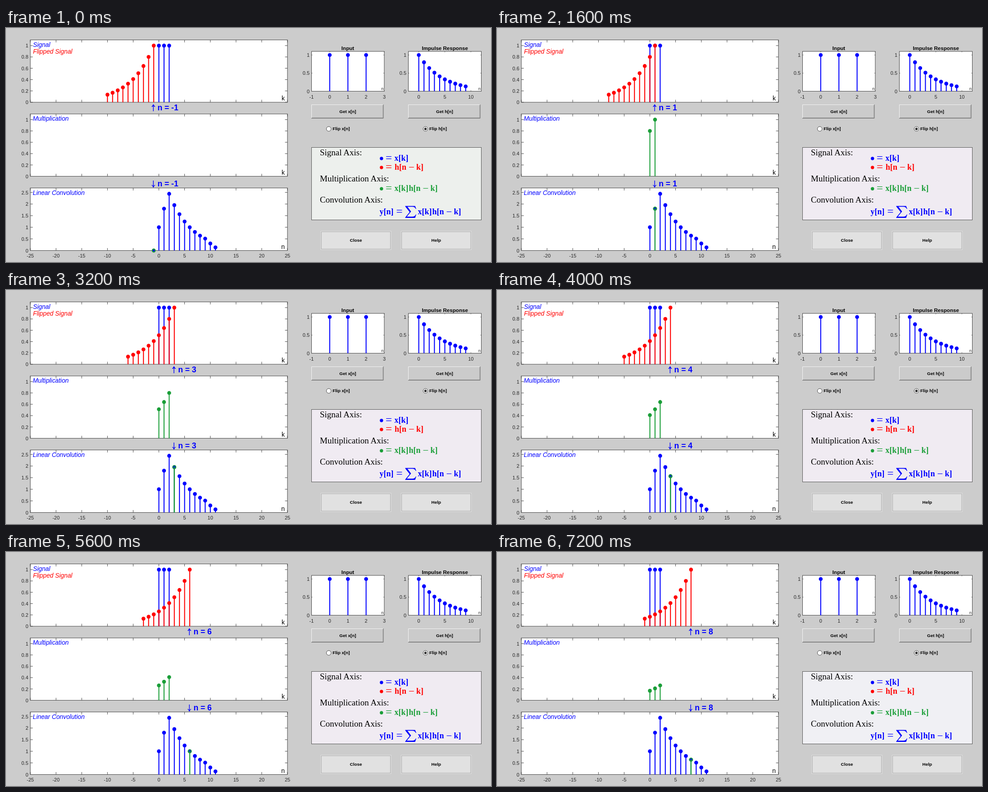
An HTML page that plays this animation: 1077 px wide and 520 px high, repeating every 8 s.

```html
<!DOCTYPE html>
<html lang="en">
<head>
<meta charset="utf-8">
<title>Discrete convolution</title>
<style>
  html, body { margin: 0; width: 100%; height: 100%; overflow: hidden; background: #ccc; }
  svg { display: block; width: 1077px; height: 520px; }
  text { font-family: "Liberation Sans", Arial, sans-serif; white-space: pre; }
  .tick { font-size: 11px; fill: #262626; }
  .title { font-size: 13.8px; font-style: italic; }
  .head { font-size: 11.6px; font-weight: bold; }
  .ui { font-size: 9.9px; font-weight: bold; }
  .mark { font-size: 17.5px; font-weight: bold; }
  .tex, .math { font-family: "Liberation Serif", "Times New Roman", serif; }
  .tex { font-size: 19px; }
  .math { font-size: 18px; font-weight: bold; }
</style>
</head>
<body>
<svg id="stage" viewBox="0 0 1077 520"></svg>
<script>
const NS = "http://www.w3.org/2000/svg";
const BLUE = "#00f", RED = "#f00", GREEN = "#1a9e38", INK = "#262626";
const STEP = 800, FIRST = -1, COUNT = 10;
const stage = document.getElementById("stage");

function add(parent, tag, attrs, content) {
  const el = document.createElementNS(NS, tag);
  for (const key in attrs) el.setAttribute(key, attrs[key]);
  if (content !== undefined) el.textContent = content;
  parent.appendChild(el);
  return el;
}
const group = () => add(stage, "g", {});
const rect = (x, y, width, height, fill, stroke = "none") =>
  add(stage, "rect", { x, y, width, height, fill, stroke });
const path = (parent, d, stroke, width) =>
  add(parent, "path", { d, stroke, "stroke-width": width, fill: "none" });
const dot = (parent, cx, cy, r, fill) => add(parent, "circle", { cx, cy, r, fill });
const text = (x, y, str, cls, fill = "#000", anchor = "start", parent = stage) =>
  add(parent, "text", { x, y, class: cls, fill, "text-anchor": anchor }, str);

// Signals
const input = k => (k >= 0 && k <= 2 ? 1 : 0);
const response = k => (k >= 0 && k <= 9 ? 0.8 ** k : 0);
const range = (from, to) => Array.from({ length: to - from + 1 }, (_, i) => from + i);
const product = (k, n) => input(k) * response(n - k);
const output = n => range(0, 2).reduce((sum, k) => sum + product(k, n), 0);

// Axes: box edges, x limits, y maximum and tick values
function makeAxes({ box: [l, t, r, b], lim: [lo, hi], top, xs, ys, len, labels }) {
  const ax = {
    x: v => l + (v - lo) / (hi - lo) * (r - l),
    y: v => b - v / top * (b - t)
  };
  rect(l, t, r - l, b - t, "#fff", "#444");
  let d = "";
  for (const v of xs) {
    d += `M${ax.x(v)} ${b}v${-len}M${ax.x(v)} ${t}v${len}`;
    if (labels) text(ax.x(v), b + (len > 3 ? 15.5 : 16), v, "tick", INK, "middle");
  }
  for (const v of ys) {
    d += `M${l} ${ax.y(v)}h${len}M${r} ${ax.y(v)}h${-len}`;
    text(l - 4.5, ax.y(v) + 4.2, v, "tick", INK, "end");
  }
  path(stage, d, "#444", 1);
  return ax;
}

function stems(parent, ax, ks, value, color) {
  for (const k of ks) {
    const x = ax.x(k), y = ax.y(value(k));
    path(parent, `M${x} ${ax.y(0)}V${y}`, color, 2.1);
    dot(parent, x, y, 4.3, color);
  }
}

rect(0, 0, 1077, 520, "#ccc");

const wide = { lim: [-25, 25], xs: range(-5, 5).map(i => i * 5), len: 5.5 };
const unit = { top: 1.1, ys: [0, 0.2, 0.4, 0.6, 0.8, 1] };
const axSignal = makeAxes({ ...wide, ...unit, box: [54, 26.5, 625, 165] });
const axProduct = makeAxes({ ...wide, ...unit, box: [54, 191, 625, 329.5] });
const axOutput = makeAxes({ ...wide, box: [54, 355.5, 625, 494.5], top: 2.69,
  ys: [0, 0.5, 1, 1.5, 2, 2.5], labels: true });
const small = { top: 1.1, ys: [0, 0.5, 1], len: 1.7, labels: true };
const axInput = makeAxes({ ...small, box: [678.5, 52, 840, 140.5], lim: [-1, 3], xs: range(-1, 3) });
const axResponse = makeAxes({ ...small, box: [893.5, 52, 1055.5, 140.5], lim: [-2, 12], xs: [0, 5, 10] });

stems(stage, axInput, range(0, 2), input, BLUE);
stems(stage, axResponse, range(0, 9), response, BLUE);
text(759, 49.3, "Input", "head", "#000", "middle");
text(974.7, 49.3, "Impulse Response", "head", "#000", "middle");
for (const x of [833.3, 1048.7]) text(x, 138.3, "n", "", INK).setAttribute("font-size", 9.5);

stems(stage, axSignal, range(0, 2), input, BLUE);
stems(stage, axOutput, range(0, 11), output, BLUE);
const live = group();

text(60, 41.5, "Signal", "title", BLUE);
text(60, 57, "Flipped Signal", "title", RED);
text(59.5, 206, "Multiplication", "title", BLUE);
text(59.5, 371, "Linear Convolution", "title", BLUE);
for (const [y, name] of [[161, "k"], [326, "k"], [491, "n"]])
  text(619, y, name, "", "#000", "end").setAttribute("font-size", 14);

// Controls
function raised(x, label) {
  rect(x, 170, 160.5, 31, "#cbcbcb");
  path(stage, `M${x + .5} 201V170.5H${x + 160}`, "#f4f4f4", 1);
  path(stage, `M${x + 1.5} 199.5H${x + 159}V171.5`, "#9e9e9e", 1);
  path(stage, `M${x} 200.5H${x + 160}V170`, "#686868", 1);
  text(x + 81, 188.7, label, "ui", "#000", "middle");
}
raised(678, "Get x[n]");
raised(893, "Get h[n]");

function radio(x, label, on) {
  add(stage, "circle", { cx: x, cy: 224.2, r: 5.2, fill: "#fff", stroke: "#444" });
  if (on) dot(stage, x, 224.2, 2.8, "#333");
  text(x + 8.5, 227.4, label, "ui");
}
radio(716.7, "Flip x[n]", false);
radio(931.5, "Flip h[n]", true);

function flat(x, label) {
  rect(x - .5, 451.5, 156, 41, "none", "#e3e3e3");
  rect(x + .8, 452.8, 153.4, 38.4, "#e1e1e1", "#adadad");
  text(x + 77.5, 475.3, label, "ui", "#000", "middle");
}
flat(699.5, "Close");
flat(877.8, "Help");

// Legend
const panel = rect(678.5, 265.5, 377, 161, "#f0ebf2", "#555");
text(697, 283, "Signal Axis:", "tex");
text(697, 341, "Multiplication Axis:", "tex");
text(697, 388.3, "Convolution Axis:", "tex");

function math(y, color, parts) {
  for (const [x, str] of parts) {
    const el = text(x, y, str, "math", color);
    if (str === "=") { el.style.fontSize = "25px"; el.style.fontWeight = "normal"; el.setAttribute("y", y + 2); }
    if (str === "−") { el.style.fontSize = "23px"; el.style.fontWeight = "normal"; el.setAttribute("y", y + 1.5); }
  }
}
const shifted = x => [[x, "h[n"], [x + 31, "−"], [x + 48, "k]"]];
for (const [y, color] of [[290, BLUE], [310, RED], [357.2, GREEN]]) dot(stage, 833.8, y, 3.7, color);
math(295, BLUE, [[843, "="], [862.5, "x[k]"]]);
math(315.3, RED, [[843, "="], ...shifted(863)]);
math(362.3, GREEN, [[843, "="], [862.5, "x[k]"], ...shifted(894.5)]);
math(414, BLUE, [[829.5, "y[n]"], [866.5, "="], [914.5, "x[k]"], ...shifted(946.5)]);
add(stage, "path", { fill: BLUE,
  d: "M886.5 395.5H908.5L911 402H909.8Q908 397.3 902 397.3H891.5L899.5 407.7L890 419.3H902Q908 419.3 909.8 414.5H911L908.5 422H886.5V421L896.3 409L886.5 396.5Z" });

// Moving parts
function marker(x, y, up, n) {
  const tip = up ? y - 13 : y + 2, tail = up ? y + 2 : y - 13, back = up ? 5 : -5;
  path(live, `M${x} ${tail}V${tip}M${x - 3.7} ${tip + back}Q${x - .8} ${tip + back * .7} ${x} ${tip}Q${x + .8} ${tip + back * .7} ${x + 3.7} ${tip + back}`, BLUE, 1.4);
  text(x + 9.2, y, "n = " + n, "mark", BLUE, "start", live);
}

function panelColor(n) {
  return n < 0 ? "#edf0ed" : n > 7 ? "#f0f0f4" : "#f0ebf2";
}

function draw(n) {
  live.replaceChildren();
  stems(live, axSignal, range(n - 9, n), k => response(n - k), RED);
  stems(live, axProduct, range(0, 2).filter(k => product(k, n)), k => product(k, n), GREEN);
  const x = axOutput.x(n), y = axOutput.y(output(n));
  path(live, `M${x} ${axOutput.y(0)}V${y}`, GREEN, 2.1);
  dot(live, x, y, 3, BLUE);
  path(live, `M${x} ${axOutput.y(0)}V${y}`, GREEN, 2.1);
  add(live, "circle", { cx: x, cy: y, r: 3.4, fill: "none", stroke: GREEN, "stroke-width": 2.1 });
  marker(x - .8, 183, true, n);
  marker(x - .8, 352, false, n);
  panel.setAttribute("fill", panelColor(n));
}

let shown = null;
function tick() {
  const n = FIRST + Math.floor(performance.now() / STEP) % COUNT;
  if (n !== shown) draw(shown = n);
  requestAnimationFrame(tick);
}
tick();
</script>
</body>
</html>
```
